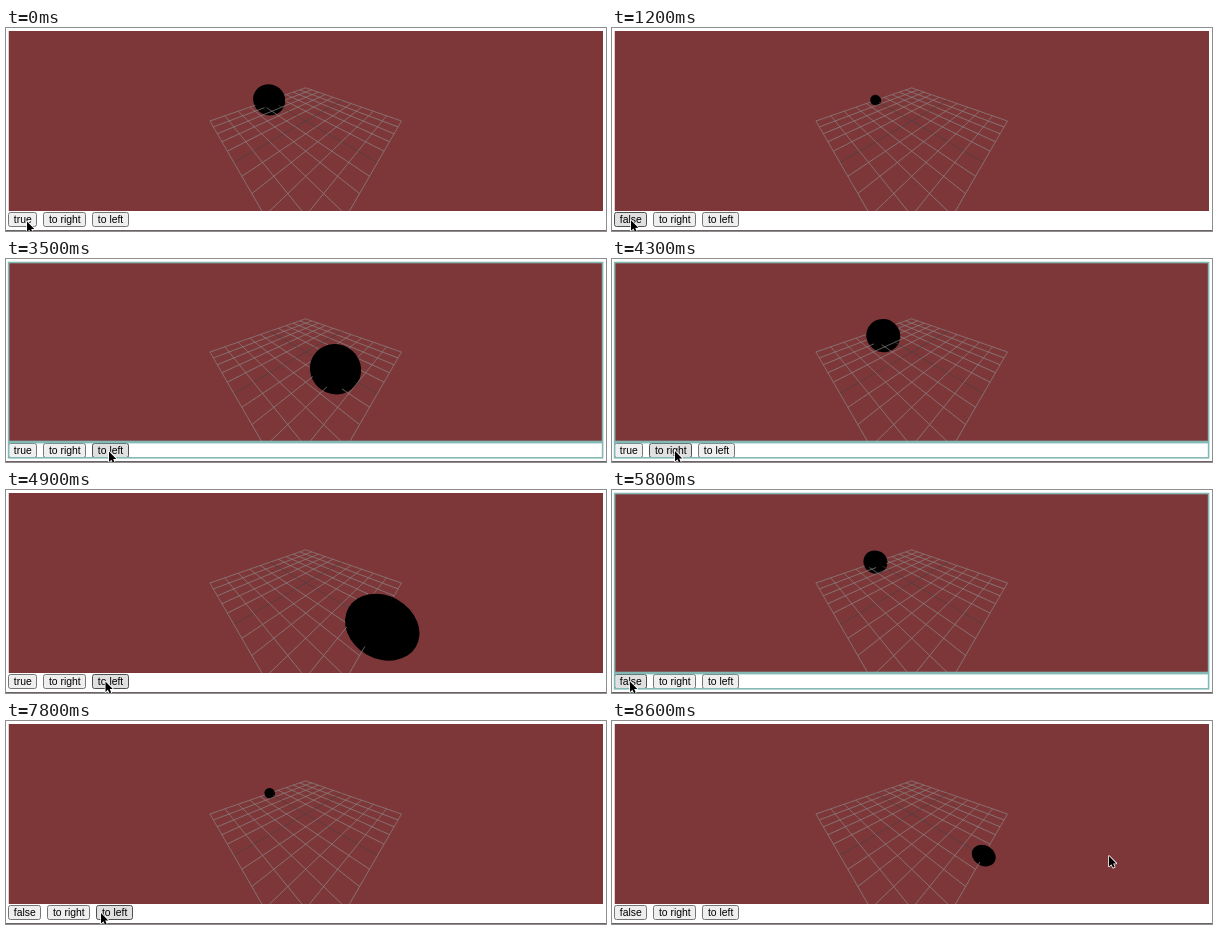
Animation, 600 px wide and 203 px high, one loop 8700 ms. Source, as an HTML page with a canvas:

```html
<!DOCTYPE html>
<html lang="en">
<head>
<meta charset="utf-8">
<title>Sphere on a grid</title>
<style>
html, body { margin: 0; width: 100%; height: 100%; overflow: hidden; background: #fff; }
#stage { position: relative; width: 600px; height: 203px; overflow: hidden; }
canvas { position: absolute; left: 0; top: 0; width: 600px; height: 203px; }
#row { position: absolute; left: 2.2px; top: 183.5px; display: flex; gap: 6px; }
#row span {
  box-sizing: border-box; height: 15.6px; padding: 0 4.6px;
  border: 1px solid #767676; border-radius: 2.5px; background: #efefef;
  font: 10.4px/13.6px "Liberation Sans", Arial, sans-serif; color: #000; white-space: pre;
}
#row span.hover { background: #e0e0e0; border-color: #4f4f4f; }
</style>
</head>
<body>
<div id="stage">
  <div id="row"><span id="toggle">true</span><span>to right</span><span>to left</span></div>
  <canvas id="view"></canvas>
</div>
<script>
const LOOP = 8700, STEP = 100;
const view = document.getElementById('view');
const toggle = document.getElementById('toggle');
const row = document.getElementById('row');
const buttons = [...row.children];
const ctx = view.getContext('2d');
const dpr = window.devicePixelRatio || 1;
view.width = 600 * dpr;
view.height = 203 * dpr;

// Scene: camera at (5,5,5) looking at the origin, 75 degree field of view
const BOX = { x: 2.5, y: 3, w: 594.5, h: 180 };
const CX = 299.7, CY = 93;
const FOCAL = 90 / Math.tan(37.5 * Math.PI / 180);
const CAM = 5, DIST = CAM * Math.sqrt(3);

// Clicks: time and action
const clicks = [
  [750, 'flip'], [1650, 'flip'], [2350, 'right'], [3426, 'left'], [4250, 'right'],
  [4930, 'left'], [5700, 'flip'], [6400, 'flip'], [7000, 'flip'], [7920, 'right']
];

// Pointer path: time, x, y
const path = [
  [0, 21, 193.5], [100, 20.5, 193], [200, 20, 192.7], [500, 20, 192.7], [600, 19, 192.3],
  [1700, 19, 192.3], [2200, 49.5, 191.5], [2700, 49.5, 191.5], [3200, 103, 192.5],
  [3500, 103, 192.5], [4000, 63, 192], [4400, 63, 192], [4800, 99.5, 191.5],
  [5000, 99.5, 191.5], [5600, 18, 191.5], [7100, 18, 191.5], [7600, 99, 192],
  [7800, 95, 192], [7900, 68, 192], [8000, 68, 192], [8500, 497, 135], [8600, 497, 135]
];

// Critically damped spring, tension 170
function spring(ms) {
  if (ms <= 0) return 0;
  const u = Math.sqrt(170) * ms / 1000;
  return 1 - (1 + u) * Math.exp(-u);
}

function stateAt(t) {
  const s = { on: true, x: -5, r: 1.5, flash: false };
  let goal = -5;
  for (const [at, act] of clicks) {
    if (t < at) break;
    const k = spring(t - at);
    if (act === 'flip') {
      s.on = !s.on;
      s.r += (s.on ? 1 : -1) * k;
    } else {
      const next = act === 'right' ? 5 : -5;
      s.x += (next - goal) * k;
      goal = next;
    }
    if (t - at <= 300) s.flash = true;
  }
  return s;
}

function pointerAt(t) {
  let i = 0;
  while (i < path.length - 1 && path[i + 1][0] <= t) i++;
  const a = path[i], b = path[i + 1] || a;
  let k = b === a ? 0 : (t - a[0]) / (b[0] - a[0]);
  k = k * k * (3 - 2 * k);
  return [a[1] + (b[1] - a[1]) * k, a[2] + (b[2] - a[2]) * k];
}

function project(x, z) {
  const f = FOCAL / (DIST - (x + z) / Math.sqrt(3));
  return [CX + f * (x - z) / Math.SQRT2, CY + f * (x + z) / Math.sqrt(6)];
}

// True when the sphere lies between the camera and a floor point
function hidden(x, z, s) {
  const dx = x - CAM, dy = -CAM, dz = z - CAM, ox = CAM - s.x;
  const a = dx * dx + dy * dy + dz * dz;
  const b = ox * dx + CAM * dy + CAM * dz;
  const c = ox * ox + 2 * CAM * CAM - s.r * s.r;
  const d = b * b - a * c;
  return d > 0 && (-b - Math.sqrt(d)) / a < 1;
}

function drawSphere(s) {
  const lat = s.x * Math.sqrt(2 / 3), depth = DIST - s.x / Math.sqrt(3);
  const th = Math.atan2(lat, depth), al = Math.asin(s.r / Math.hypot(lat, depth));
  const far = FOCAL * Math.tan(th + al), near = FOCAL * Math.tan(th - al);
  const c = (far + near) / 2, tilt = Math.PI / 6;
  const minor = FOCAL * Math.sin(al) / Math.sqrt(Math.cos(th) ** 2 - Math.sin(al) ** 2);
  ctx.fillStyle = '#000';
  ctx.beginPath();
  ctx.ellipse(CX + c * Math.cos(tilt), CY + c * Math.sin(tilt), (far - near) / 2, minor, tilt, 0, 7);
  ctx.fill();
}

function drawLine(at, alongX, s) {
  let pen = false;
  ctx.beginPath();
  for (let i = 0; i <= 160; i++) {
    const v = -5 + i / 16;
    const x = alongX ? v : at, z = alongX ? at : v;
    if (hidden(x, z, s)) { pen = false; continue; }
    const p = project(x, z);
    if (pen) ctx.lineTo(...p); else ctx.moveTo(...p);
    pen = true;
  }
  ctx.stroke();
}

function drawScene(s) {
  ctx.save();
  ctx.beginPath();
  ctx.rect(BOX.x, BOX.y, BOX.w, BOX.h);
  ctx.clip();
  ctx.fillStyle = '#7e3739';
  ctx.fillRect(BOX.x, BOX.y, BOX.w, BOX.h);
  drawSphere(s);
  ctx.lineWidth = 0.8;
  for (let i = -5; i <= 5; i++) {
    ctx.strokeStyle = i ? '#8c8686' : '#4b4040';
    drawLine(i, true, s);
    drawLine(i, false, s);
  }
  ctx.restore();
}

function drawFlash() {
  ctx.strokeStyle = '#83b8b5';
  ctx.lineWidth = 1.6;
  ctx.strokeRect(2.6, 3.5, 594, 179);
  ctx.strokeRect(2.6, 183.6, 594, 15.2);
}

function drawPointer(x, y) {
  ctx.save();
  ctx.translate(x, y);
  ctx.beginPath();
  [[0, 0], [0, 10.4], [2.4, 8.2], [4, 11.8], [5.7, 11], [4.2, 7.6], [7.3, 7.4]]
    .forEach(p => ctx.lineTo(...p));
  ctx.closePath();
  ctx.lineJoin = 'round';
  ctx.lineWidth = 1.5;
  ctx.strokeStyle = '#fff';
  ctx.stroke();
  ctx.fillStyle = '#000';
  ctx.fill();
  ctx.restore();
}

function render(t) {
  const s = stateAt(t), [px, py] = pointerAt(t);
  toggle.textContent = String(s.on);
  for (const b of buttons) {
    const left = row.offsetLeft + b.offsetLeft - (b.offsetParent === row ? 0 : row.offsetLeft);
    const over = t >= 500 && py > 183 && py < 199 && px >= left && px <= left + b.offsetWidth;
    b.classList.toggle('hover', over);
  }
  ctx.setTransform(dpr, 0, 0, dpr, 0, 0);
  ctx.clearRect(0, 0, 600, 203);
  drawScene(s);
  ctx.fillStyle = '#6b6265';
  ctx.fillRect(0, 202, 600, 1);
  if (s.flash) drawFlash();
  drawPointer(px, py);
}

const start = performance.now();
function tick() {
  const t = (performance.now() - start) % LOOP;
  render(Math.floor(t / STEP) * STEP);
  requestAnimationFrame(tick);
}
tick();
</script>
</body>
</html>
```
